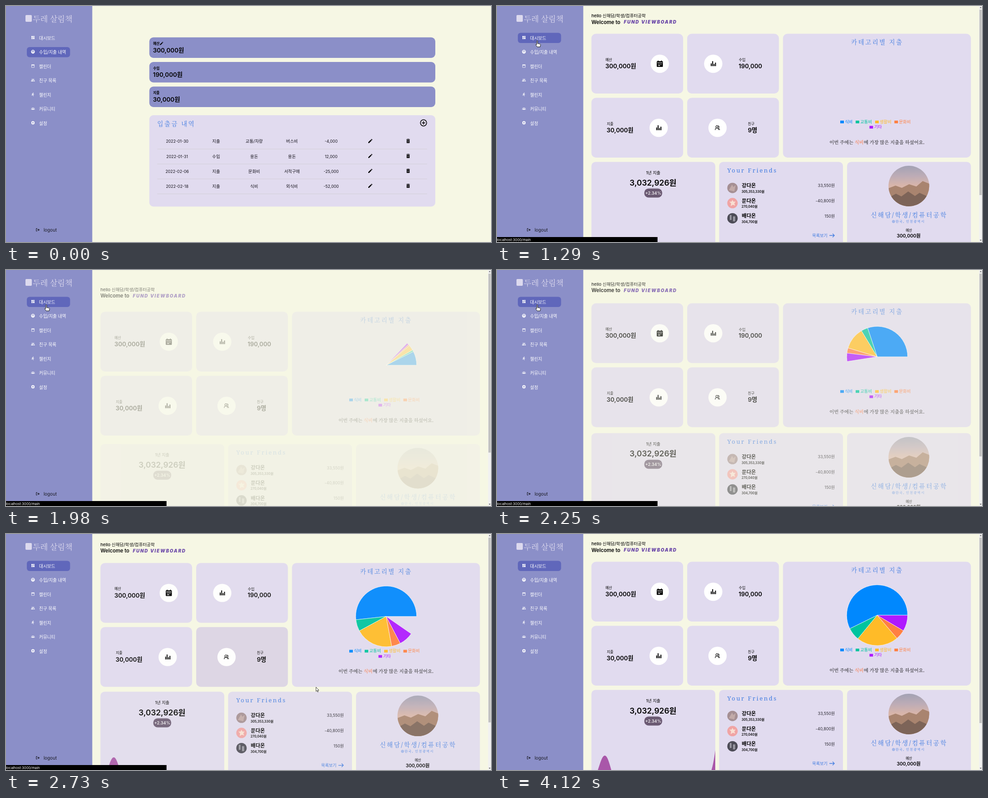
An HTML page that plays this animation: 1071 px wide and 523 px high, repeating every 4180 ms.

```html
<!DOCTYPE html>
<html lang="ko">
<head>
<meta charset="utf-8">
<title>가계부 대시보드</title>
<style>
  html, body { margin: 0; width: 100%; height: 100%; overflow: hidden; background: #f6f7e4; }
  svg { display: block; }
  text { font-family: Inter, 'Noto Sans CJK KR', 'Noto Sans CJK', sans-serif; white-space: pre; }
  .m { font-weight: 500; }
  .b { font-weight: 600; }
  .serif { font-family: 'Noto Serif', 'Noto Serif CJK KR', 'Noto Sans CJK KR', serif; font-weight: 300; }
  .mid { text-anchor: middle; }
  .end { text-anchor: end; }
  .head { fill: #3f7be0; letter-spacing: 2.5px; }
  .brand { font-weight: 900; font-style: italic; letter-spacing: 1.7px; fill: #6a47a8; }
  .line { fill: none; stroke: #000; stroke-linecap: round; stroke-linejoin: round; }
</style>
</head>
<body>
<svg id="stage" width="1071" height="523" viewBox="0 0 1071 523"></svg>
<script>
const LOOP = 4180;
const LILAC = '#8b8fc8', CARD = '#e1dbef', HOVER = '#dcd4e5', ACTIVE = '#6067bb', BLUE = '#3f7be0';

const ICONS = {
  board: 'M3 13h8V3H3zM3 21h8v-6H3zM13 21h8V11h-8zM13 3v6h8V3z',
  coin: 'M12 1a11 11 0 1 0 0 22 11 11 0 0 0 0-22zM12 5a7 7 0 0 0-7 7h2l3-3h4l3 3h2a7 7 0 0 0-7-7zM8 14h8v2H8z',
  date: 'M19 4h-1V2h-2v2H8V2H6v2H5a2 2 0 0 0-2 2v14a2 2 0 0 0 2 2h14a2 2 0 0 0 2-2V6a2 2 0 0 0-2-2zM19 20H5V9h14z',
  pair: 'M16 11a3.2 3.2 0 1 0 0-6.4 3.2 3.2 0 0 0 0 6.4zM8 11a3.2 3.2 0 1 0 0-6.4 3.2 3.2 0 0 0 0 6.4zM8 13c-2.3 0-7 1.2-7 3.5V19h14v-2.5C15 14.2 10.3 13 8 13zM16 13l-1 .1c1.2.8 2 2 2 3.4V19h6v-2.5c0-2.3-4.7-3.5-7-3.5z',
  run: 'M13.5 5.5a2 2 0 1 0 0-4 2 2 0 0 0 0 4zM9.9 19.4l1-4.4 2.1 2v6h2v-7.5l-2.1-2 .6-3A7.3 7.3 0 0 0 19 13v-2a4.9 4.9 0 0 1-4.3-2.4l-1-1.6c-.4-.6-1-1-1.7-1L6 8.3V13h2V9.6l1.8-.7-1.6 8.1-4.9-1-.4 2z',
  crowd: 'M12 12a3.2 3.2 0 1 0 0-6.4 3.2 3.2 0 0 0 0 6.4zM6 19v-2c0-5 12-5 12 0v2zM4.5 12a2.2 2.2 0 1 0 0-4.4 2.2 2.2 0 0 0 0 4.4zM19.5 12a2.2 2.2 0 1 0 0-4.4 2.2 2.2 0 0 0 0 4.4zM1 18v-2c0-2 2-3 4-3v5zM23 18v-2c0-2-2-3-4-3v5z',
  gear: 'M12 1l4 3 5 1v14l-5 1-4 3-4-3-5-1V5l5-1zM12 8a4 4 0 1 0 0 8 4 4 0 0 0 0-8z',
  exit: 'M10 4H3v16h7v-2H5V6h5zM16 6l6 6-6 6-1.4-1.4L18 13H9v-2h9l-3.4-3.6z',
  pen: 'M3 17.2V21h3.8L17.8 9.9l-3.7-3.7zM20.7 7a1 1 0 0 0 0-1.4l-2.3-2.3a1 1 0 0 0-1.4 0l-1.9 1.8 3.8 3.8z',
  bin: 'M5 22h14V7H5zM20 3h-4l-1-1H9L8 3H4v2.5h16zM9 10h1.5v9H9zM13.5 10H15v9h-1.5z',
  bars: 'M3 11h3.4v10H3zM8.2 3h3.4v18H8.2zM13.4 13h3.4v8h-3.4zM18.6 8H22v13h-3.4z',
  sheet: 'M3 6a2 2 0 0 1 2-2h1V2h2v2h8V2h2v2h1a2 2 0 0 1 2 2v13a2 2 0 0 1-2 2H5a2 2 0 0 1-2-2zM4.5 8h15v1.4h-15zM7 12h2v2H7zM11 12h2v2h-2zM15 12h2v2h-2zM7 16h6v2H7z'
};

const text = (x, y, size, str, cls = '', fill = '') =>
  `<text x="${x}" y="${y}" font-size="${size}" class="${cls}"${fill && ` fill="${fill}"`}>${str}</text>`;
const box = (x, y, w, h, r, fill, extra = '') =>
  `<rect x="${x}" y="${y}" width="${w}" height="${h}" rx="${r}" fill="${fill}" ${extra}/>`;
const disc = (x, y, r, fill) => `<circle cx="${x}" cy="${y}" r="${r}" fill="${fill}"/>`;
const icon = (name, x, y, size, fill = '#000') =>
  `<path d="${ICONS[name]}" fill="${fill}" fill-rule="evenodd" transform="translate(${x - size / 2} ${y - size / 2}) scale(${size / 24})"/>`;

const MENU = [['board', '대시보드'], ['coin', '수입/지출 내역'], ['date', '캘린더'], ['pair', '친구 목록'],
  ['run', '챌린지'], ['crowd', '커뮤니티'], ['gear', '설정']];

function sidebar() {
  return box(0, 0, 190.5, 523, 0, LILAC)
    + box(43, 20, 14, 15, 2, '#dcd9ee')
    + text(59, 35, 17.3, '두레 살림책', 'serif', '#dcd9ee')
    + box(46, 59.5, 95.5, 22.5, 6, ACTIVE, 'id="tabMain"')
    + box(46, 91, 95.5, 22.5, 6, ACTIVE, 'id="tabList"')
    + MENU.map(([name, label], i) => {
      const y = 71 + i * 31.5;
      return icon(name, 59.5, y - 1.2, 9, '#fff') + text(73, y + 3.6, 9.7, label, 'm', '#fff');
    }).join('')
    + icon('exit', 70, 496, 9.5) + text(83, 500.3, 9.8, 'logout', '', '#1c1c26');
}

function history() {
  const sums = [['예산', '300,000원'], ['수입', '190,000원'], ['지출', '30,000원']];
  const rows = [
    ['2022-01-30', '지출', '교통/차량', '버스비', '-4,000'],
    ['2022-01-31', '수입', '용돈', '용돈', '12,000'],
    ['2022-02-06', '지출', '문화비', '서적구매', '-25,000'],
    ['2022-02-18', '지출', '식비', '외식비', '-52,000']];
  const cols = [378, 464, 548, 631.5, 718];
  return sums.map(([label, sum], i) => {
      const y = 69.5 + i * 54.5;
      return box(316.5, y, 631.5, 45.5, 9, LILAC)
        + text(325, y + 16.7, 7.7, label, 'b') + text(324.5, y + 33, 13.4, sum, 'b');
    }).join('')
    + icon('pen', 343.5, 83, 9.5)
    + box(316.5, 242, 631.5, 202.5, 9, CARD)
    + text(334, 266, 13.6, '입출금 내역', 'serif head')
    + '<g class="line" stroke-width="1.5"><circle cx="922" cy="259" r="6.9"/><path d="M918.7 259h6.6M922 255.7v6.6"/></g>'
    + rows.map((row, i) => {
      const y = 300 + i * 33.1;
      return row.map((s, c) => text(cols[c], y + 3.4, c % 4 ? 9.4 : 8.8, s, 'mid', '#15131c')).join('')
        + icon('pen', 804.5, y - .8, 12) + icon('bin', 888, y - .8, 11)
        + box(334, y + 16.5, 596, 1, 0, '#d3cfd8');
    }).join('');
}

const SLICES = [['식비', '#0088fe', .573, 758, 254], ['교통비', '#00c49f', .068, 792, 254],
  ['생활비', '#ffbb28', .2215, 835, 254], ['문화비', '#ff8042', .0525, 877.5, 254], ['기타', '#af19ff', .085, 822.5, 265.6]];

function topCards() {
  return box(208.5, 61.5, 202.5, 132.5, 10, CARD) + box(420, 61.5, 202.5, 132.5, 10, CARD)
    + box(208.5, 203.5, 202.5, 132.5, 10, CARD) + box(420, 203.5, 202.5, 132.5, 10, CARD, 'id="friendCard"')
    + box(631.5, 61.5, 415, 274.5, 10, CARD)
    + text(239.5, 121.7, 8, '예산', 'm') + text(239.3, 138, 13.3, '300,000원', 'b')
    + text(534, 122.3, 8, '수입', 'm') + text(533.5, 137.6, 13.1, '190,000', 'b')
    + text(242.5, 263.8, 8, '지출', 'm') + text(242, 280, 13.3, '30,000원', 'b')
    + text(554, 263.8, 8, '친구', 'm') + text(554, 280, 13.3, '9명', 'b')
    + [[359.5, 128], [477.5, 128], [357, 270], [487, 270]].map(([x, y]) => disc(x, y, 20.2, '#fff')).join('')
    + icon('sheet', 359.5, 128.2, 18) + icon('bars', 477.5, 127.8, 14.5) + icon('bars', 357, 269.8, 14.5)
    + '<path class="line" stroke-width="1.1" d="M485.5 270.2a2.4 2.4 0 1 1 .1 0zM481.9 274.4c0-5.2 7.2-5.2 7.2 0M488.4 265.6a2.3 2.3 0 0 1 .8 4.4M489.6 271.4q2 .8 2 3"/>'
    + text(839.5, 85, 13.5, '카테고리별 지출', 'serif head mid')
    + '<g id="pie" stroke="#fff" stroke-width=".7"></g>'
    + SLICES.map(([label, color, , x, y]) => box(x, y, 8, 6, 0, color) + text(x + 10.2, y + 5.6, 9.4, label, '', color)).join('')
    + text(839, 305.6, 10.4, '이번 주에는 <tspan fill="#ff6a2a">식비</tspan>에 가장 많은 지출을 하셨어요.', 'serif mid', '#111');
}

function lowCards() {
  const friends = [
    ['강다온', '305,353,330원', '33,550원', '#a58f93', '#c9b0ae', 'M-8 5L-1-7 2-2 7-6 4 8z'],
    ['문다온', '270,040원', '-40,800원', '#f0a4a4', '#fbeedd', 'M0-7l2 4 5 0-3 4 2 5-5-2-5 3 1-6-4-4 5 0z'],
    ['배다온', '304,700원', '150원', '#4d4c57', '#a9a8b2', 'M-6-7h4V4h-4zM1-4h5V7H1z']];
  return [208.5, 490.5, 773].map(x => box(x, 345.5, 273.5, 200, 9, CARD)).join('')
    + text(345, 373, 9.2, '1년 지출', 'm mid') + text(344.5, 397.5, 17.4, '3,032,926원', 'b mid')
    + box(325.2, 404.5, 39.6, 20, 9.5, '#6b5a73') + text(345, 418, 9.3, '+2.34%', 'm mid', '#fff')
    + '<g clip-path="url(#reveal)" fill="#a957a9"><path d="M222 525C228 508 232 491 238 491S248 508 253 525V560H222z"/><path d="M473 525Q478 510 482 479V560H473z"/></g>'
    + text(508.5, 369, 13.2, 'Your Friends', 'serif head')
    + friends.map(([name, own, sum, dark, light, shape], i) => {
      const y = 402 + i * 33.6;
      return disc(520, y + 1.2, 11.5, dark)
        + `<path d="${shape}" transform="translate(520 ${y + 1})" fill="${light}" opacity=".8"/>`
        + text(540.5, y + .2, 11.3, name, 'b') + text(540, y + 11.6, 7, own, 'b')
        + text(746, y - .6, 8.9, sum, 'end', '#2c2a33');
    }).join('')
    + text(696, 512, 9.2, '목록보기', 'm', BLUE)
    + `<path class="line" style="stroke:${BLUE}" stroke-width="1.3" d="M734.5 508.5H745M741.5 505l3.5 3.5-3.5 3.5"/>`
    + '<g clip-path="url(#photo)"><rect x="864" y="354" width="91" height="91" fill="url(#sky)"/>'
    + '<path d="M864 404l16-6 14 5 16-8 16 5 14-12 15 6v51h-91z" fill="#a9846f"/>'
    + '<path d="M864 425l17-9 12 6 15-11 15 10 10-7 22 10v30h-91z" fill="#7d6458"/></g>'
    + text(910, 468, 13.6, '신해담/학생/컴퓨터공학', 'serif head mid')
    + `<g fill="none" stroke="${BLUE}" stroke-width=".7"><circle cx="875.6" cy="477.6" r="2.7"/><circle cx="875.6" cy="477.6" r="1"/></g>`
    + `<g letter-spacing="1.3">${text(880, 480.3, 7.3, '한국, 인천광역시', 'serif', BLUE)}</g>`
    + text(909.5, 500, 7.7, '예산', 'm mid') + text(909, 512.8, 10.3, '300,000원', 'b mid');
}

const $ = id => document.getElementById(id);
$('stage').innerHTML = `<defs>
  <clipPath id="reveal"><rect id="sweep" x="208.5" y="430" width="0" height="130"/></clipPath>
  <clipPath id="photo"><circle cx="909.5" cy="399" r="45"/></clipPath>
  <linearGradient id="sky" x2="0" y2="1"><stop offset="0" stop-color="#a3a2b4"/><stop offset=".25" stop-color="#bdacb6"/><stop offset=".48" stop-color="#d8b5aa"/></linearGradient>
  </defs>
  <rect width="1071" height="523" fill="#f6f7e4"/>
  ${sidebar()}
  <g id="list">${history()}</g>
  <g id="main">
    <g id="hello">${text(208.5, 25.3, 9.6, 'hello 신해담/학생/컴퓨터공학', 'm')}${text(208.5, 39.5, 11.2, 'Welcome to', 'b')}${text(280, 39.2, 10, 'FUND VIEWBOARD', 'brand')}</g>
    <g id="top">${topCards()}</g>
    <g id="low">${lowCards()}</g>
    ${box(1064.5, 0, 6.5, 523, 0, '#f1f1f1')}${box(1065.3, 8, 5, 411, 0, '#c1c1c1', 'id="thumb"')}
    <path d="M1066 4.5l2-2.5 2 2.5zM1066 518l2 2.5 2-2.5z" fill="#555"/>
  </g>
  <g id="status">${box(0, 512, 354.5, 11, 0, '#000')}${text(0, 520.6, 7.7, 'localhost:3000/main', '', '#fff')}</g>
  <g id="cursor" fill="#fff" stroke="#111" stroke-width=".8" stroke-linejoin="round">
    <path id="arrow" d="M0 0v9.4l2.1-2 1.5 3.5 1.4-.6-1.5-3.4h2.9z"/>
    <path id="hand" transform="scale(1.2)" d="M-.6 .6c0-1.1 1.7-1.1 1.7 0v4.6l4.2.9c1 .2 1.3.8 1.1 1.8l-.8 3.5H.4l-2.7-3.6c-.6-1 .6-1.6 1.2-.9l.5.6z"/>
  </g>`;

// Runs of screen updates: first, last, count. The picture holds between them.
const RUNS = [[130, 610, 8], [670, 1090, 6], [1220, 1360, 3], [1700, 2180, 8], [2250, 2730, 8], [2800, 3300, 8], [3350, 3570, 4], [3850, 4120, 5]];
function tick(t) {
  const run = RUNS.filter(r => t >= r[0]).pop();
  if (!run) return 0;
  const [a, b, n] = run, step = (b - a) / (n - 1);
  return a + Math.min(n - 1, Math.floor((t - a) / step + .01)) * step;
}

function bezier(x1, y1, x2, y2) {
  const at = (p, q, s) => 3 * p * s * (1 - s) ** 2 + 3 * q * s * s * (1 - s) + s ** 3;
  return x => {
    if (x <= 0) return 0;
    if (x >= 1) return 1;
    let lo = 0, hi = 1;
    for (let i = 0; i < 24; i++) {
      const s = (lo + hi) / 2;
      if (at(x1, x2, s) < x) lo = s; else hi = s;
    }
    return at(y1, y2, lo);
  };
}
const rise = bezier(.5, 0, 0, 1), ease = bezier(.25, .1, .25, 1);

// Linear path through [time, ...values] points.
function track(t, pts) {
  let i = 1;
  while (i < pts.length - 1 && t > pts[i][0]) i++;
  const a = pts[i - 1], b = pts[i];
  const k = Math.max(0, Math.min(1, (t - a[0]) / (b[0] - a[0])));
  return a.slice(1).map((v, j) => v + (b[j + 1] - v) * k);
}
const PATH = [[130, 1029, 509], [610, 112, 97.5], [920, 88.5, 77], [2250, 88.5, 77], [2730, 684.6, 339.3], [3300, 1047.5, 500.5]];
const SWEEP = [[2250, 208.5], [2700, 256], [3780, 473], [4120, 482.2]];

const show = (id, on) => $(id).setAttribute('visibility', on ? 'visible' : 'hidden');

// Slides a group up 60px; its fade lags a little behind the slide.
function reveal(id, t, start, span) {
  const p = t < 1360 ? 1 : rise((t - start) / span), off = 60 * (1 - p);
  $(id).setAttribute('opacity', p ** 1.65);
  $(id).setAttribute('transform', `translate(0 ${off})`);
  return off;
}

function pie(p) {
  const cx = 839.5, cy = 180, r = 67.3;
  const pt = a => `${cx + r * Math.cos(a)} ${cy - r * Math.sin(a)}`;
  let from = 0;
  $('pie').innerHTML = p <= 0 ? '' : SLICES.map(([, color, part]) => {
    const to = from + part * p * Math.PI * 2;
    const d = `M${cx} ${cy}L${pt(from)}A${r} ${r} 0 ${to - from > Math.PI ? 1 : 0} 0 ${pt(to)}z`;
    from = to;
    return `<path d="${d}" fill="${color}"/>`;
  }).join('');
}

function draw(now) {
  const t = tick(now % LOOP), main = t >= 1220;
  $('list').style.display = main ? 'none' : '';
  $('main').style.display = main ? '' : 'none';
  show('tabList', !main);
  show('tabMain', t > 850);
  show('status', t > 850 && t < 2860);
  if (main) {
    reveal('hello', t, 1265, 2000);
    reveal('top', t, 1357, 2000);
    const off = reveal('low', t, 1382, 2150);
    $('thumb').setAttribute('height', 411 - Math.min(39, off) * .37);
    pie(ease((t - 1794) / 1490));
    $('friendCard').setAttribute('fill', t > 2500 && t < 2790 ? HOVER : CARD);
    $('sweep').setAttribute('width', track(t, SWEEP)[0] - 208.5);
  }
  const [x, y] = track(t, PATH), link = x < 141 && y < 113;
  $('cursor').setAttribute('transform', `translate(${x} ${y})`);
  const shown = t >= 130 && t < 3340;
  show('arrow', shown && !link);
  show('hand', shown && link);
}

const begin = performance.now();
function loop() {
  draw(performance.now() - begin);
  requestAnimationFrame(loop);
}
loop();
</script>
</body>
</html>
```
